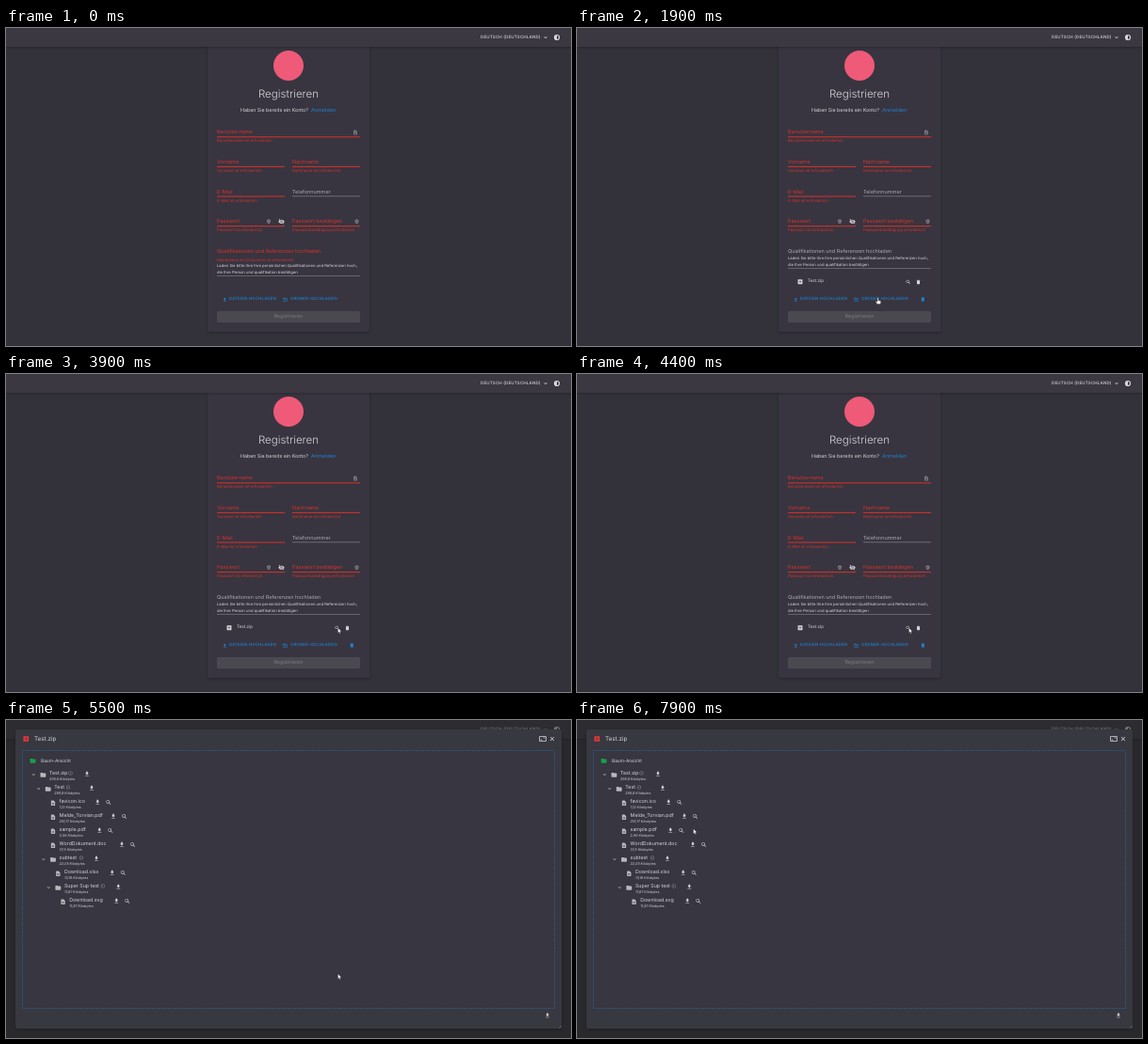
An HTML page that plays this animation: 600x338 px, repeating every 8 s.

```html
<!DOCTYPE html>
<html lang="de">
<head>
<meta charset="utf-8">
<title>Registrieren</title>
<style>
html, body { margin: 0; width: 100%; height: 100%; overflow: hidden; background: #33323b; }
svg { display: block; width: 100vw; height: 100vh; }
text { font-family: Inter, sans-serif; dominant-baseline: central; text-rendering: geometricPrecision; white-space: pre; }
</style>
</head>
<body>
<svg id="stage" viewBox="0 0 600 338">
  <defs>
    <filter id="soft" x="-20%" y="-20%" width="140%" height="150%">
      <feDropShadow dx="0" dy="1" stdDeviation="1.4" flood-color="#000" flood-opacity=".3"/>
    </filter>
  </defs>
  <rect width="600" height="338" fill="#33323b"/>
  <g id="form"></g>
  <g id="invalid"></g>
  <g id="zone"></g>
  <g id="valid"></g>
  <g id="bar"></g>
  <rect id="shade" width="600" height="338" fill="#212121"/>
  <g id="dialog"></g>
  <g id="cursor">
    <path id="arrow" d="M0 0v5.6l1.3-1.2.9 2 .9-.4-.9-2h1.8z" fill="#fff" stroke="#16161a" stroke-width=".4"/>
    <path id="hand" d="M-.6.5Q0-.3.6.5V3l2 .6q.7.2.6 1L2.8 6.9H-.9L-2.6 4.3q.2-.9 1.1-.3l.9.6z" fill="#fff" stroke="#16161a" stroke-width=".4"/>
  </g>
</svg>
<script>
const $ = id => document.getElementById(id);
const RED = '#d9302a', BLUE = '#1f80d2', GREY = '#a9a8ae', LIGHT = '#d6d5d9', DIM = '#77767d';

const ICONS = {
  down: 'M5 20h14v-2H5zM19 9h-4V3H9v6H5l7 7z',
  up: 'M5 20h14v-2H5zM5 10h4v6h6v-6h4l-7-7z',
  folder: 'M10 4H4a2 2 0 0 0-2 2v12a2 2 0 0 0 2 2h16a2 2 0 0 0 2-2V8a2 2 0 0 0-2-2h-8z',
  folderUp: 'M10 4H4a2 2 0 0 0-2 2v12a2 2 0 0 0 2 2h16a2 2 0 0 0 2-2V8a2 2 0 0 0-2-2h-8zM4 8h16v10H4zM11 17v-4H8l4-4 4 4h-3v4z',
  chevron: 'M7.4 8 12 12.6 16.600 8 18.500 10l-6.500 6.500L5.500 10z',
  zoom: 'M15.5 14h-.8a6.5 6.5 0 1 0-.7.7v.8l5 5 1.5-1.5zm-6 0a4.5 4.5 0 1 1 0-9 4.5 4.5 0 0 1 0 9z',
  trash: 'M6 19q0 2 2 2h8q2 0 2-2V7H6zM19 4h-3.5l-1-1h-5l-1 1H5v2h14z',
  close: 'M19 6.4 17.6 5 12 10.6 6.4 5 5 6.4l5.6 5.6L5 17.6 6.4 19l5.6-5.6 5.6 5.6 1.4-1.4-5.6-5.6z',
  info: 'M11 7h2v2h-2zm0 4h2v6h-2zm1-9a10 10 0 1 0 0 20 10 10 0 0 0 0-20zm0 18a8 8 0 1 1 0-16 8 8 0 0 1 0 16z',
  file: 'M14 2H6a2 2 0 0 0-2 2v16a2 2 0 0 0 2 2h12a2 2 0 0 0 2-2V8zM8 11h8v2H8zM8 16h8v2H8z',
  contrast: 'M12 1a11 11 0 1 0 0 22 11 11 0 0 0 0-22zm0 18V5a7 7 0 0 1 0 14z',
  eyeOff: 'M12 5C7 5 3 8 1 12c2 4 6 7 11 7s9-3 11-7c-2-4-6-7-11-7zm0 3a4 4 0 1 1 0 8 4 4 0 0 1 0-8zM2 3.5 3.5 2l18 18-1.5 1.5z',
  shield: 'M12 2 4 5v6q0 8 8 11 8-3 8-11V5zM11 8h2v8h-2z',
  zip: 'M3 3h18v18H3zM11 7h2v4h4v2h-4v4h-2v-4H7v-2h4z',
  screen: 'M0 3h24v18H0zm2.5 2.5v13h19v-13zM14 7h5v5h-2V9h-3zM5 12h2v3h3v2H5z'
};

// small sizes sit slightly below the geometric centre
const text = (x, y, size, fill, str, extra = '') =>
  `<text x="${x}" y="${y + .5}" font-size="${size}" fill="${fill}" ${extra}>${str}</text>`;
const icon = (name, x, y, size, fill) =>
  `<path transform="translate(${x - size / 2} ${y - size / 2}) scale(${size / 24})" fill-rule="evenodd" fill="${fill}" d="${ICONS[name]}"/>`;
const rect = (x, y, w, h, fill, extra = '') =>
  `<rect x="${x}" y="${y}" width="${w}" height="${h}" fill="${fill}" ${extra}/>`;
const caps = 'font-weight="500" letter-spacing=".15"';

function field(x, row, width, label, error) {
  const y = 110.8 + 31.6 * row, color = error ? RED : GREY;
  return text(x, y, 5.5, color, label) +
    rect(x, y + 4.5, width, error ? 1 : .7, error ? RED : '#85848b') +
    (error ? text(x, y + 9.5, 4.2, RED, error) : '');
}

function hint(y) {
  return text(224, y, 4.2, LIGHT, 'Laden Sie bitte Ihre Ihre persönlichen Qualifikationen und Referenzen hoch,') +
    text(224, y + 7, 4.2, LIGHT, 'die Ihre Person und qualifikation bestätigen') +
    rect(224, y + 10.2, 152, .6, '#85848b');
}

const section = color => text(224, 237.4, 5.5, color, 'Qualifikationen und Referenzen hochladen');

$('form').innerHTML =
  rect(214, 10, 172, 313, '#383640', 'rx="2" filter="url(#soft)"') +
  '<circle cx="300" cy="40" r="16" fill="#ee5a78"/>' +
  text(300, 69.3, 11.6, LIGHT, 'Registrieren', 'font-weight="300" text-anchor="middle"') +
  text(249, 87.4, 5.3, LIGHT, 'Haben Sie bereits ein Konto?') +
  text(324, 87.4, 5.5, BLUE, 'Anmelden') +
  field(224, 0, 152, 'Benutzername', 'Benutzername ist erforderlich') +
  field(224, 1, 72, 'Vorname', 'Vorname ist erforderlich') +
  field(304, 1, 72, 'Nachname', 'Nachname ist erforderlich') +
  field(224, 2, 72, 'E-Mail', 'E-Mail ist erforderlich') +
  field(304, 2, 72, 'Telefonnummer') +
  field(224, 3, 72, 'Passwort', 'Passwort ist erforderlich') +
  field(304, 3, 72, 'Passwort bestätigen', 'Passwortbestätigung erforderlich') +
  icon('file', 371, 111, 6, DIM) +
  icon('shield', 279, 205.7, 6, DIM) +
  icon('eyeOff', 292.5, 205.7, 7, LIGHT) +
  icon('shield', 372.5, 205.7, 6, DIM) +
  icon('up', 232.3, 288.7, 5.5, BLUE) +
  text(237, 288.4, 4.4, BLUE, 'DATEIEN HOCHLADEN', caps) +
  icon('folderUp', 296.5, 288.5, 5.8, BLUE) +
  text(302, 288.4, 4.4, BLUE, 'ORDNER HOCHLADEN', caps) +
  rect(224, 301, 152, 12, '#4a4950', 'rx="1.5"') +
  text(300, 306.7, 5.5, '#7b7a81', 'Registrieren', 'text-anchor="middle"');

$('invalid').innerHTML = section(RED) +
  text(224, 246.8, 4.2, RED, 'Mindestens ein Dokument ist erforderlich') + hint(252.8);

$('zone').innerHTML = rect(224.4, 265.5, 151.4, 17.8, '#363540',
  'stroke="#1f70b4" stroke-width=".8" rx=".6" filter="url(#soft)"');

$('valid').innerHTML = section(GREY) + hint(245) +
  icon('zip', 237, 269.7, 6.5, LIGHT) +
  text(245, 269.4, 4.6, LIGHT, 'Test.zip') +
  icon('zoom', 351.7, 270, 6, LIGHT) +
  icon('trash', 362.5, 270, 6, LIGHT) +
  icon('trash', 367.3, 288.2, 6, BLUE);

$('bar').innerHTML = rect(-4, -4, 608, 24, '#3a3742', 'filter="url(#soft)"') +
  text(504, 9.6, 4.5, LIGHT, 'DEUTSCH (DEUTSCHLAND)', caps) +
  icon('chevron', 573, 10, 6, LIGHT) +
  icon('contrast', 585, 10, 6.8, LIGHT);

// depth, label, size in kilobytes, x of download icon, x of info icon (folders)
const TREE = [
  [0, 'Test.zip', '299,8', 86, 68.5],
  [1, 'Test', '299,8', 91, 66],
  [2, 'favicon.ico', '1,12', 97.3],
  [2, 'Melde_Torvian.pdf', '216,17', 114],
  [2, 'sample.pdf', '2,96', 99.3],
  [2, 'WordDokument.doc', '37,5', 123],
  [2, 'subtest', '22,05', 96, 80],
  [3, 'Download.xlsx', '10,18', 112.7],
  [3, 'Super Sup test', '11,87', 119.3, 102.7],
  [4, 'Download.svg', '11,87', 117.3]
];

function node([depth, label, size, down, info], i) {
  const x = 46 + 5.3 * depth, y = 56 + 15 * i;
  return text(x, y, 5.3, LIGHT, label) +
    text(x, y + 5.8, 3.7, LIGHT, size + ' Kilobytes', 'font-style="italic"') +
    icon(info ? 'folder' : 'file', x - 6.6, y + 2.3, info ? 7 : 6.5, '#b9b8bd') +
    icon('down', down, y + 1.3, 6.5, LIGHT) +
    (info ? icon('chevron', x - 16.7, y + 2, 6, GREY) + icon('info', info, y + .5, 5, GREY)
          : icon('zoom', down + 11.6, y + 1.5, 7, LIGHT));
}

$('dialog').innerHTML =
  rect(10, 10, 580, 318, '#393741', 'rx="2" filter="url(#soft)"') +
  icon('zip', 21.3, 20, 7.5, '#e8363a') +
  text(30, 19.8, 6.3, LIGHT, 'Test.zip') +
  icon('screen', 570, 20, 7.5, LIGHT) +
  icon('close', 580, 20, 7.5, LIGHT) +
  rect(17.5, 32.5, 565, 274, '#383640', 'stroke="#27618f" stroke-width=".8" stroke-dasharray="1.6 .8"') +
  icon('folder', 28.5, 43.3, 7, '#14a04a') +
  text(37, 43, 4.8, LIGHT, 'Baum-Ansicht') +
  TREE.map(node).join('') +
  icon('down', 575, 314, 6.5, LIGHT) +
  `<path d="M587.5 327.5l2-2" stroke="${GREY}" stroke-width=".5"/>`;

// pointer route: time, x, y
const ROUTE = [
  [1400, 300, 276], [1800, 319.5, 286.5], [2200, 319.8, 286.5], [2700, 338, 284.5],
  [3100, 351.5, 270.5], [3200, 352.4, 269.8], [5700, 352.4, 269.8], [6100, 190, 110],
  [6350, 62, 26], [6600, 26, 68], [6900, 8, 84], [7200, 34, 112],
  [7500, 82, 129], [7900, 123.5, 115.6], [8000, 123.5, 115.6]
];

const ramp = (t, a, b) => Math.min(1, Math.max(0, (t - a) / (b - a)));

function pointer(t) {
  const i = Math.max(1, ROUTE.findIndex(p => p[0] > t));
  const [t0, x0, y0] = ROUTE[i - 1], [t1, x1, y1] = ROUTE[i];
  const k = ramp(t, t0, t1);
  return [x0 + (x1 - x0) * k, y0 + (y1 - y0) * k];
}

const show = (id, on) => { $(id).style.display = on ? '' : 'none'; };

function draw(t) {
  const dropped = t >= 1400;
  show('invalid', !dropped);
  show('valid', dropped);
  show('zone', t > 450 && !dropped);
  $('zone').setAttribute('opacity', ramp(t, 450, 1100));
  $('shade').setAttribute('opacity', .52 * ramp(t, 4450, 4700));

  const left = 1 - ramp(t, 4800, 5500);
  show('dialog', t > 4800);
  $('dialog').setAttribute('transform', `translate(0 ${328 * Math.pow(left, 1.81)})`);
  $('dialog').setAttribute('opacity', ramp(t, 4800, 5270));

  const [x, y] = pointer(t);
  const onButton = y > 284 && t < 3000;
  show('cursor', dropped);
  show('hand', onButton);
  show('arrow', !onButton);
  $('cursor').setAttribute('transform', `translate(${x} ${y})`);
}

const start = performance.now();
function tick() {
  draw((performance.now() - start) % 8000);
  requestAnimationFrame(tick);
}
draw(0);
requestAnimationFrame(tick);
</script>
</body>
</html>
```
